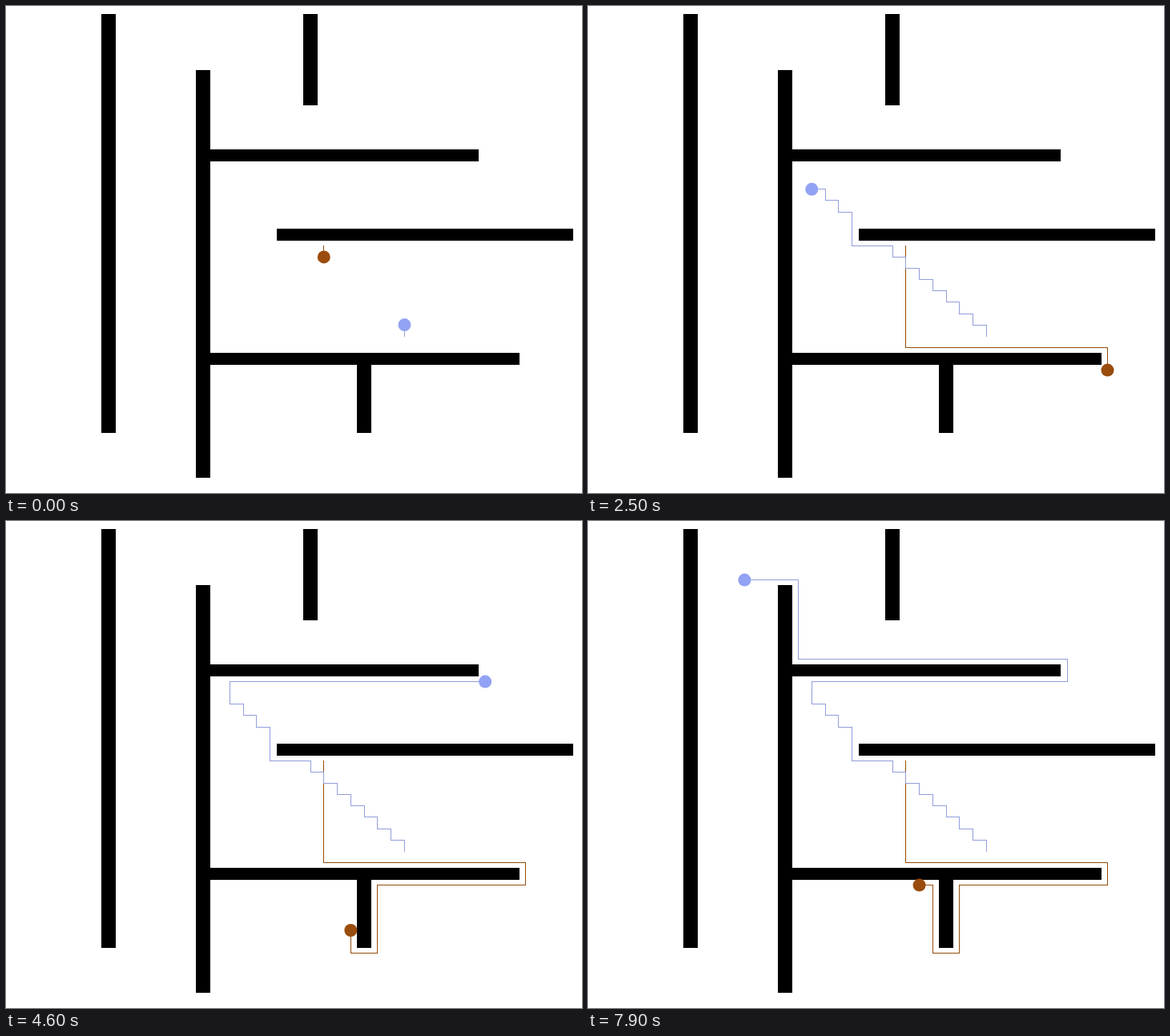
Animation of 719 by 608 pixels, one loop 8000 ms. Source, as an HTML page with a canvas:

```html
<!DOCTYPE html>
<html lang="en">
<head>
<meta charset="utf-8">
<title>Maze walkers</title>
<style>
html, body { margin: 0; width: 100%; height: 100%; overflow: hidden; background: #fff; }
canvas { display: block; }
</style>
</head>
<body>
<canvas width="719" height="608"></canvas>
<script>
const ctx = document.querySelector('canvas').getContext('2d');
const LOOP = 8000, STEP = 100;

const walls = [
  [119, 10, 18, 523], [371, 10, 18, 114], [237, 80, 18, 509],
  [255, 179, 335, 15], [338, 278, 370, 15], [255, 433, 386, 15],
  [438, 448, 18, 85]
];

const dirs = { U: [0, -1], D: [0, 1], L: [-1, 0], R: [1, 0] };

// Turns a route such as "D9 R15" into the list of grid cells visited.
function walk(col, row, route) {
  const cells = [[col, row]];
  for (const [, dir, count] of route.matchAll(/([UDLR])(\d+)/g)) {
    for (let i = 0; i < count; i++) {
      col += dirs[dir][0];
      row += dirs[dir][1];
      cells.push([col, row]);
    }
  }
  return cells.map(([c, r]) => [396.8 + 16.78 * c, 299.35 + 14.11 * r]);
}

const walkers = [
  { dot: '#9a4c0c', line: '#974d0a',
    path: walk(0, 0, 'D9 R15 D2 L11 D6 L2 U6 L1') },
  { dot: '#92a2f4', line: '#929edb',
    path: walk(6, 8, 'U1' + 'L1U1'.repeat(7) + 'L3 U3 L1U1 L1U1 L1 U2 R19 U2 L20 U7 L4') }
];

function drawSegment([x1, y1], [x2, y2]) {
  const left = Math.floor(Math.min(x1, x2)), right = Math.floor(Math.max(x1, x2));
  const top = Math.floor(Math.min(y1, y2)), bottom = Math.floor(Math.max(y1, y2));
  ctx.fillRect(left, top, right - left + 1, bottom - top + 1);
}

function drawWalker({ dot, line, path }, steps) {
  const last = Math.min(steps, path.length - 1);
  ctx.fillStyle = line;
  for (let i = 0; i < last; i++) drawSegment(path[i], path[i + 1]);
  ctx.fillStyle = dot;
  ctx.beginPath();
  ctx.arc(...path[last], 8, 0, 2 * Math.PI);
  ctx.fill();
}

function draw() {
  const steps = 1 + Math.floor(performance.now() % LOOP / STEP);
  ctx.fillStyle = '#fff';
  ctx.fillRect(0, 0, 719, 608);
  ctx.fillStyle = '#000';
  walls.forEach(wall => ctx.fillRect(...wall));
  walkers.forEach(walker => drawWalker(walker, steps));
  requestAnimationFrame(draw);
}
draw();
</script>
</body>
</html>
```
